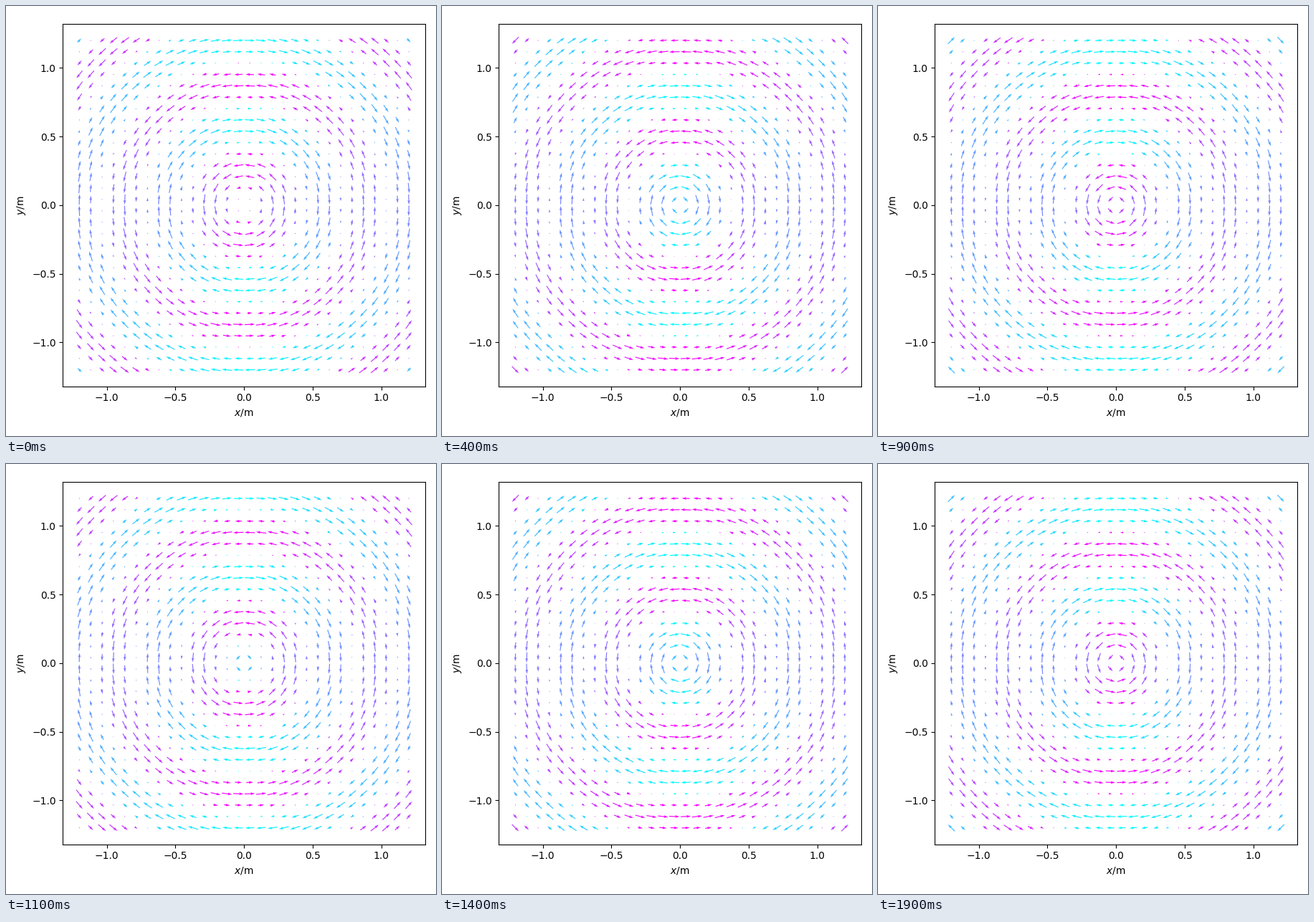
These frames come from a looping animation (600x600 px, 2000 ms). A matplotlib script:

```python
import numpy as np
import matplotlib.pyplot as plt
from matplotlib.animation import FuncAnimation

FRAMES = 20
PERIOD = 10          # frames per oscillation
K = 2 * np.pi / 0.6  # wave number, 1/m

axis = np.linspace(-1.2, 1.2, 30)
X, Y = np.meshgrid(axis, axis)
R = np.hypot(X, Y)
TILT = np.arcsin(np.abs(Y) / R) / (np.pi / 2)


def field(i):
    """Azimuthal field of an oscillating dipole: components and colour value."""
    wave = np.sin(K * R - np.arctan(K * R) - 2 * np.pi * (i % PERIOD) / PERIOD)
    return -Y / R * wave, X / R * wave, np.sign(wave) * TILT


fig, ax = plt.subplots(figsize=(6, 6), dpi=100)
arrows = ax.quiver(X, Y, *field(0), pivot="mid", cmap="cool", clim=(-1, 1))
ax.set_aspect("equal")
ax.set_xlabel(r"$x/\mathrm{m}$")
ax.set_ylabel(r"$y/\mathrm{m}$")
fig.tight_layout()


def update(i):
    arrows.set_UVC(*field(i))
    return (arrows,)


anim = FuncAnimation(fig, update, frames=FRAMES, interval=100, repeat=True)
plt.show()
```
